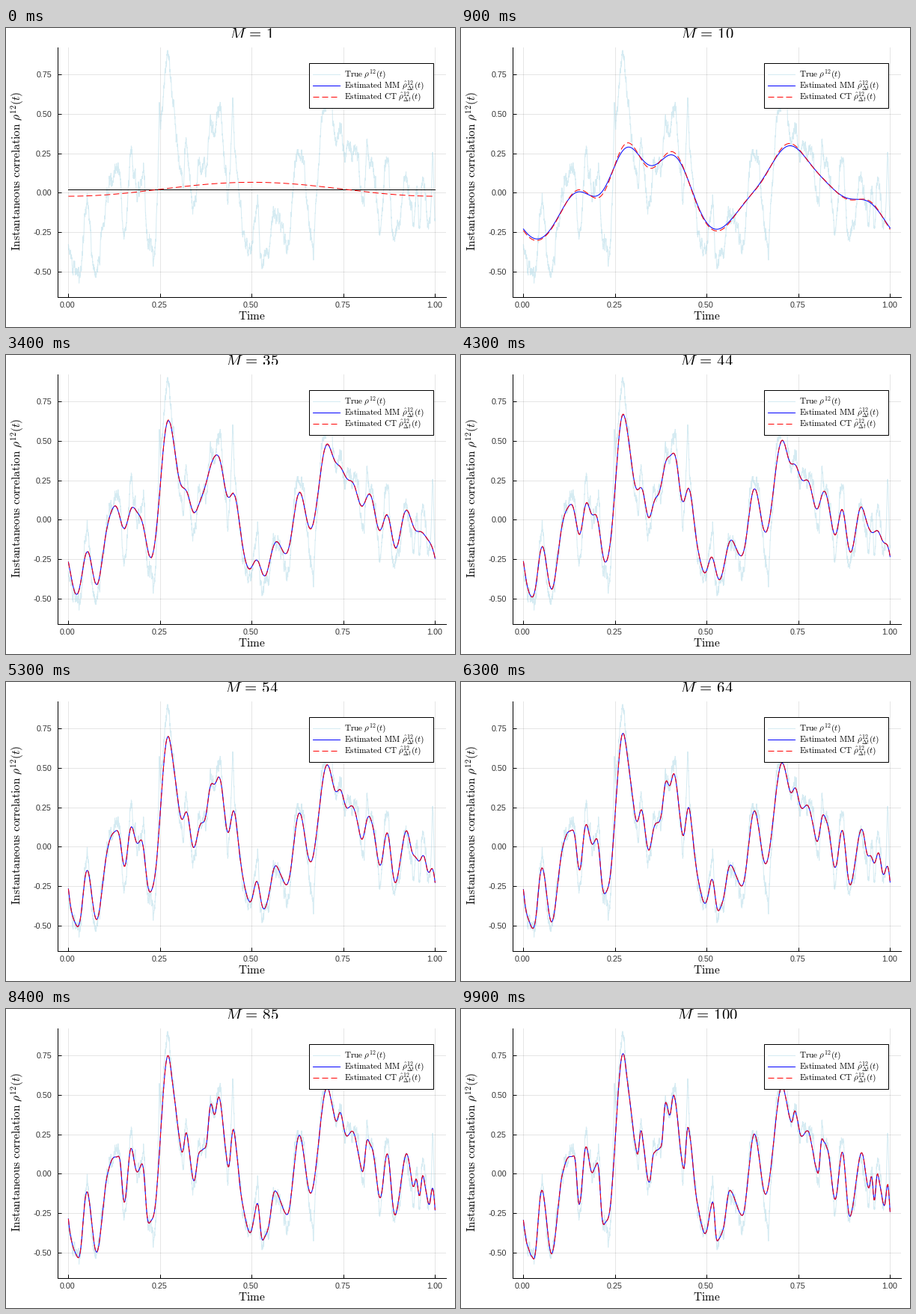
These frames come from a looping animation (600 by 400 pixels, 10000 ms). A matplotlib script:

```python
import numpy as np
import matplotlib.pyplot as plt
from matplotlib.animation import FuncAnimation
from matplotlib.patches import Rectangle
from matplotlib.transforms import Bbox

W, H, DPI = 600, 400, 100
PX = 72 / DPI                    # points per pixel
X0, XS = 83.4, 490               # stage x of t = 0, pixels per unit
Y0, YS = 220.25, 210.5           # stage y of rho = 0, pixels per unit
LEFT, RIGHT, TOP, BOTTOM = 68.7, 588.1, 25.6, 360.2
PERIOD = 1.002
M_MAX = 100

plt.rcParams.update({"mathtext.fontset": "cm", "font.family": "Liberation Sans"})

# Main turning points of the smoothed path, in stage pixels
KNOTS = [
    (83.5, 282), (88, 312), (97.5, 332), (108, 240), (121, 325), (135.5, 218),
    (144, 195), (151.5, 194), (158, 259), (167, 181), (175, 216), (182.5, 203),
    (190, 285), (197, 276), (216.5, 57), (224, 108), (236.5, 192), (240, 161),
    (251.5, 231), (257.5, 192), (267.5, 183), (273.5, 124), (279, 142),
    (284, 115), (298, 214), (303, 159), (315, 256), (326.5, 302), (336.5, 260),
    (342, 312), (350, 298), (359, 245), (376, 279), (392, 170), (407, 251),
    (429, 106), (442, 154), (446, 139), (455, 173), (463, 165), (477.5, 221),
    (482, 176), (490, 190), (500, 256), (509.5, 192), (519.5, 278),
    (535.5, 192), (545, 239), (548.5, 223), (552.5, 256), (556, 220),
    (566, 262), (570, 233),
]
# Sharpest excursions of the true path
SPIKES = [(197, 328), (205, 90), (303, 90), (411, 300), (429, 92), (570, 164)]


def monotone_cubic(x, y, q):
    """Shape-preserving Hermite interpolation."""
    h, d = np.diff(x), np.diff(y) / np.diff(x)
    a, b = d[:-1], d[1:]
    m = np.zeros_like(y)
    same = a * b > 0
    m[1:-1][same] = 2 * a[same] * b[same] / (a[same] + b[same])
    m[0], m[-1] = d[0], d[-1]
    i = np.clip(np.searchsorted(x, q, side="right") - 1, 0, len(h) - 1)
    s = (q - x[i]) / h[i]
    return (y[i] * (1 + 2 * s) * (1 - s) ** 2 + y[i + 1] * s**2 * (3 - 2 * s)
            + h[i] * s * (1 - s) * (m[i] * (1 - s) - m[i + 1] * s))


def to_data(points):
    x, y = np.array(points, float).T
    return (x - X0) / XS, (Y0 - y) / YS


def fourier_coefficients():
    """Coefficients of the path, undoing the Fejer weights of M_MAX."""
    kt, kv = to_data(KNOTS)
    kt[0] = 0
    kt, kv = np.append(kt, PERIOD), np.append(kv, kv[0])
    n = 2048
    v = monotone_cubic(kt, kv, np.arange(n) * PERIOD / n)
    k = np.arange(M_MAX)
    c = np.fft.rfft(v)[:M_MAX] / n / (1 - k / M_MAX)
    c[0], c[1] = 0.0215, -0.0444
    return c


COEF = fourier_coefficients()
K = np.arange(M_MAX)


def fejer(t, order):
    w = np.clip(1 - K / order, 0, None) * np.where(K == 0, 1, 2)
    return (np.exp(2j * np.pi * np.outer(t, K) / PERIOD) @ (w * COEF)).real


def true_path(n=4000):
    t = np.linspace(0, 1, n)
    rng = np.random.default_rng(12)
    noise = np.convolve(rng.normal(size=n + 200), np.exp(-np.arange(201) / 22), "valid")
    smooth = fejer(t, M_MAX)
    base = smooth + 0.7 * (smooth - fejer(t, M_MAX // 2))
    path = base + 0.045 * noise / noise.std()
    for st, sv in zip(*to_data(SPIKES)):
        path += (sv - np.interp(st, t, base)) * np.exp(-np.abs(t - st) * XS / 2)
    return t, path


fig = plt.figure(figsize=(W / DPI, H / DPI), dpi=DPI, facecolor="white")
ax = fig.add_axes([LEFT / W, 1 - BOTTOM / H, (RIGHT - LEFT) / W, (BOTTOM - TOP) / H])
ax.set_xlim((LEFT - X0) / XS, (RIGHT - X0) / XS)
ax.set_ylim((Y0 - BOTTOM) / YS, (Y0 - TOP) / YS)
ax.spines[["top", "right"]].set_visible(False)
ax.spines[["left", "bottom"]].set_linewidth(PX)
ax.set_xticks(np.arange(5) / 4)
ax.set_yticks(np.arange(-2, 4) / 4)
ax.tick_params(direction="in", length=5 * PX, width=PX, labelbottom=False, labelleft=False)
ax.grid(color="black", alpha=0.1, linewidth=PX)
ax.set_axisbelow(True)

# Overlay in stage pixels for labels and legend
ov = fig.add_axes([0, 0, 1, 1], zorder=5)
ov.set(xlim=(0, W), ylim=(H, 0))
ov.axis("off")


def label(x, y, s, size, **kw):
    kw = {"ha": "center", "va": "baseline", **kw}
    return ov.text(x, y, s, fontsize=size * PX, **kw)


for v in np.arange(5) / 4:
    label(X0 + XS * v - 1, 374, f"{v:.2f}", 10.8, color="#333333")
for v in np.arange(-2, 4) / 4:
    label(61, Y0 - YS * v + 4, f"{v:.2f}", 10.8, ha="right", color="#333333")

label(328.5, 390, r"$\mathrm{Time}$", 15.4)
label(21, 191.5, r"$\mathrm{Instantaneous\ correlation}\ \rho^{12}(t)$", 15.4,
      rotation=90, rotation_mode="anchor")
title = label(328.5, 14, "", 20.8, clip_on=True)
title.set_clip_box(Bbox.from_bounds(0, H - 13, W, 13))

TRUE = dict(color="lightblue", alpha=0.5, linewidth=PX)
MM = dict(color="blue", linewidth=PX)
CT = dict(color="red", linewidth=PX, linestyle=(0, (8, 4)), dash_capstyle="butt")

ov.add_patch(Rectangle((404.5, 46.5), 166, 60.5, facecolor="white",
                       edgecolor="black", linewidth=PX))
HAT = r"\hat{\rho}^{12}_{\Delta t}(t)"
ENTRIES = [(r"$\mathrm{True}\ \rho^{12}(t)$", TRUE),
           (r"$\mathrm{Estimated\ MM}\ " + HAT + "$", MM),
           (r"$\mathrm{Estimated\ CT}\ " + HAT + "$", CT)]
for row, (text, style) in enumerate(ENTRIES):
    y = 61.5 + 15 * row
    ov.plot([410, 446], [y, y], **style)
    label(452, y + 3.5, text, 11.2, ha="left")

ax.plot(*true_path(), **TRUE)
T = np.linspace(0, 1, 501)
mm_line, = ax.plot([], [], **MM)
ct_line, = ax.plot([], [], **CT)


def update(i):
    m = i + 1
    mm_line.set_data(T, fejer(T, m))
    mm_line.set_color("black" if m == 1 else "blue")
    ct_line.set_data(T, fejer(T, m + 1))
    title.set_text(rf"$M\,=\,{m}$")
    return mm_line, ct_line, title


anim = FuncAnimation(fig, update, frames=M_MAX, init_func=lambda: update(0),
                     interval=100, repeat=True, repeat_delay=0, blit=False)
plt.show()
```
